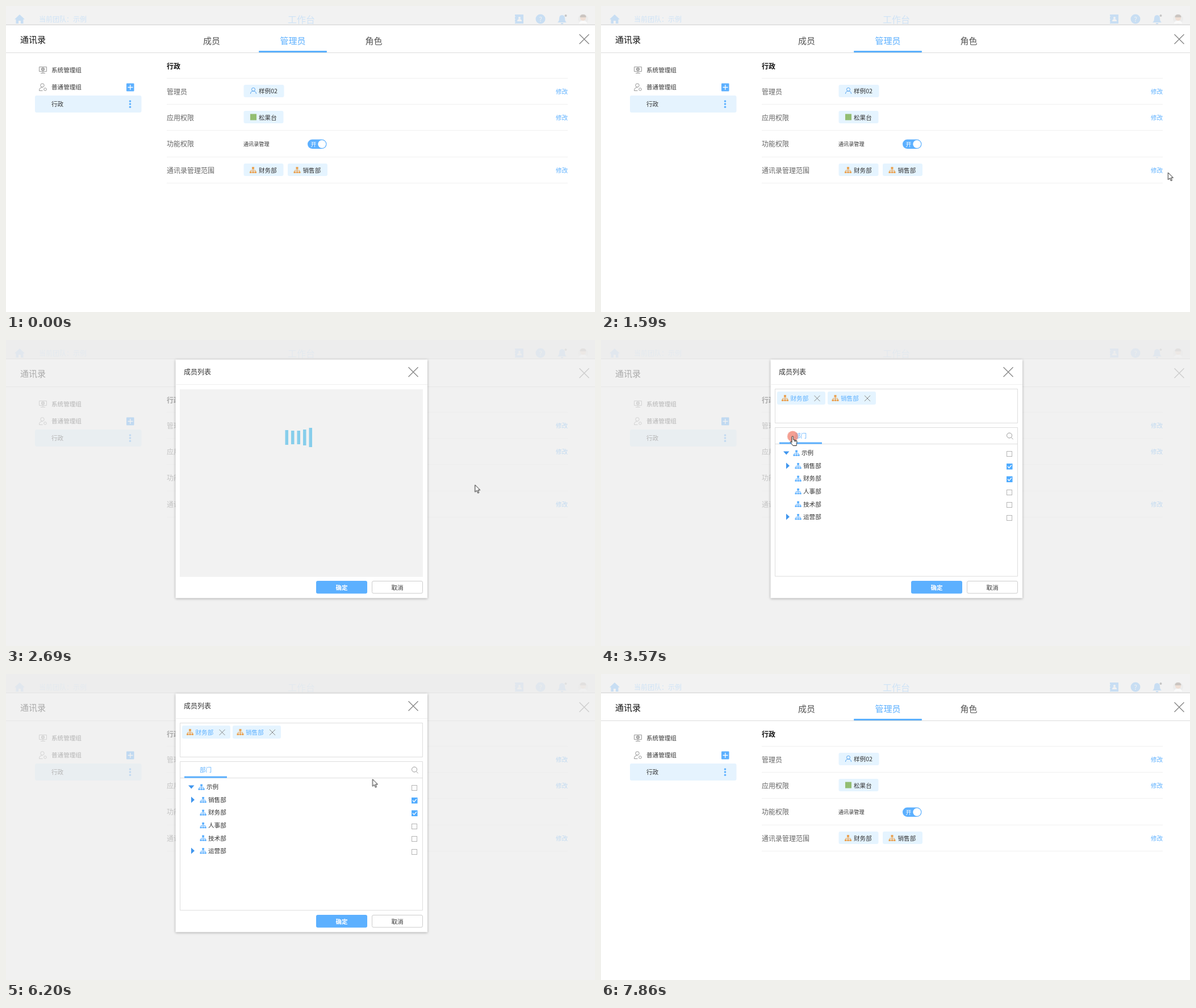
Recreate the animation shown at these times as an HTML page. Size 1037 by 540 pixels, loop 8.34 s.

```html
<!DOCTYPE html>
<html lang="zh-CN">
<head>
<meta charset="utf-8">
<title>通讯录</title>
<style>
html, body { margin: 0; width: 100%; height: 100%; overflow: hidden; background: #fff; }
svg { display: block; }
#stage { width: 1037px; height: 540px; font: 10.6px "Noto Sans CJK SC", "Noto Sans CJK", sans-serif; }
text { fill: #333; white-space: pre; }
.big { font-size: 15px; }
.mid { font-size: 12px; }
.small { font-size: 9.1px; }
.label text { font-size: 12px; fill: #666; }
.bold { font-weight: bold; }
.blue { fill: #5cb0ff; }
.link text { fill: #5cb0ff; }
.white { fill: #fff; }
.chip { fill: #e5f4ff; }
.org { color: #eaa457; }
.tree { color: #5cb0ff; }
.rule { stroke: #f0f0f0; fill: none; }
.frame { stroke: #ddd; fill: none; }
.icon { stroke: #999; fill: none; }

.veil, .dialog, .loader, .picked, .menu, .cursor, .shown, .arrow, .hand, .press {
  animation: 8340ms linear infinite;
}
.veil { animation-name: veil; }
.dialog { animation-name: drop, fade; }
.loader { animation-name: load; animation-timing-function: step-end; }
.picked { animation-name: pick; animation-timing-function: step-end; }
.menu { animation-name: menu; animation-timing-function: step-end; }
.cursor { animation-name: travel; }
.shown { animation-name: shown; animation-timing-function: step-end; }
.arrow { animation-name: arrow; animation-timing-function: step-end; }
.hand { animation-name: hand; animation-timing-function: step-end; }
.press { animation-name: press; animation-timing-function: step-end; }
.bars rect {
  fill: #87ceeb; transform-box: fill-box; transform-origin: center;
  animation: pulse 834ms ease-in-out calc(var(--i) * 100ms - 751ms) infinite;
}

@keyframes veil {
  0%, 25.18% { opacity: 0; }
  26.98%, 92.33% { opacity: 1; }
  94.12%, 100% { opacity: 0; }
}
@keyframes drop {
  0% { transform: translateY(-135px); }
  25.26% { transform: translateY(-135px); animation-timing-function: ease-out; }
  28.86% { transform: none; }
  88.97% { transform: none; animation-timing-function: ease-out; }
  92.57%, 100% { transform: translateY(-135px); }
}
@keyframes fade {
  0%, 25.26% { opacity: 0; }
  27.06%, 88.97% { opacity: 1; }
  90.77%, 100% { opacity: 0; }
}
@keyframes load { 0% { opacity: 1; } 32.37%, 100% { opacity: 0; } }
@keyframes pulse { 0%, 100% { transform: scaleY(.65); } 50% { transform: none; } }
@keyframes pick {
  0% { clip-path: inset(0 100% 0 0); }
  45.56% { clip-path: inset(0 50% 0 0); }
  47.6% { clip-path: inset(0 0 0 0); }
  65.83%, 100% { clip-path: inset(0 100% 0 0); }
}
@keyframes menu { 0% { opacity: 0; } 49.52% { opacity: 1; } 65.83%, 100% { opacity: 0; } }
@keyframes shown { 0% { opacity: 0; } 3.71% { opacity: 1; } 94.24%, 100% { opacity: 0; } }
@keyframes arrow {
  0% { opacity: 1; } 22.3% { opacity: 0; } 25.42% { opacity: 1; } 40.77% { opacity: 0; }
  58.75% { opacity: 1; } 85.85% { opacity: 0; } 89.21%, 100% { opacity: 1; }
}
@keyframes hand {
  0% { opacity: 0; } 22.3% { opacity: 1; } 25.42% { opacity: 0; } 40.77% { opacity: 1; }
  58.75% { opacity: 0; } 85.85% { opacity: 1; } 89.21%, 100% { opacity: 0; }
}
@keyframes press {
  0% { opacity: 0; } 23.5% { opacity: .75; } 24.7% { opacity: 0; } 42.75% { opacity: .75; }
  47.5% { opacity: 0; } 65.1% { opacity: .75; } 66.1% { opacity: 0; } 87.7% { opacity: .75; }
  88.73%, 100% { opacity: 0; }
}
@keyframes travel {
  0%, 3.71% { transform: translate(620px, 482px); }
  7.55% { transform: translate(760px, 400px); }
  11.39% { transform: translate(940px, 312px); }
  13.31% { transform: translate(975px, 303px); }
  19.06% { transform: translate(998.5px, 294px); }
  22.78%, 28.66% { transform: translate(984px, 288px); }
  35.13% { transform: translate(700px, 230px); }
  40.89% { transform: translate(342px, 171px); }
  41.85%, 43.76% { transform: translate(337.5px, 170px); }
  47.6%, 57.25% { transform: translate(376.5px, 175.5px); }
  66.79% { transform: translate(565px, 300px); }
  68.71% { transform: translate(575px, 297px); }
  70.62% { transform: translate(610px, 250px); }
  72.54% { transform: translate(640px, 205px); }
  74.34% { transform: translate(645.5px, 185px); }
  80.34% { transform: translate(610px, 476px); }
  83.93% { transform: translate(600px, 450px); }
  86.81%, 100% { transform: translate(592px, 437px); }
}
</style>
</head>
<body>
<svg id="stage" viewBox="0 0 1037 540">
  <defs>
    <g id="org" fill="currentColor">
      <path d="M4 0h4v4H4zM0 8h3.5v3H0zM4.3 8h3.5v3H4.3zM8.5 8H12v3H8.5z"/>
      <path d="M6 4v4M1.8 8V6h8.4v2" fill="none" stroke="currentColor"/>
    </g>
    <path id="cross" d="M0 0 17 17M17 0 0 17" stroke="#888" stroke-width="1.4"/>
    <path id="xs" d="M0 0 10 10M10 0 0 10" stroke="#888"/>
    <rect id="box" x="714.5" y="-4.5" width="9" height="9" fill="#fff" stroke="#b5b5b5"/>
    <g id="tick">
      <rect x="714" y="-5" width="10.5" height="10.5" fill="#4fabff"/>
      <path d="m716 0 2.4 2.6 4.4-5" fill="none" stroke="#fff" stroke-width="1.4"/>
    </g>
    <path id="closed" d="M326 -5.5 332 0 326 5.5Z" fill="#4096ee"/>
  </defs>

  <!-- top bar -->
  <path d="M0 0h1037v33H0z" fill="#f2f2f2"/>
  <path d="M0 32.5h1037" stroke="#e9e9e9"/>
  <path d="M0 33.5h1037" stroke="#d9d9d9"/>
  <g fill="#c8def3">
    <path d="M24 15 33 23.5h-2.5V31H26v-5h-4v5h-4.5v-7.5H15Z"/>
    <path d="M896 15h15v16h-15z"/>
    <circle cx="941" cy="23" r="8.5"/>
    <path d="M971 29q3-2 3-7 0-6 5-6t5 6q0 5 3 7ZM977 30h4v2h-4Z"/>
    <text class="mid" style="fill:#cfe3f6" x="58" y="27.5">当前团队：示例</text>
    <text style="fill:#cfe3f6;font-size:16px" x="496" y="30">工作台</text>
  </g>
  <circle cx="985.5" cy="17" r="2" fill="#c5c5c5"/>
  <g fill="#f2f2f2">
    <circle cx="904" cy="21" r="2"/><path d="M900 27q0-4 4-4t4 4ZM895 18h2v1h-2zM895 23h2v1h-2zM895 28h2v1h-2z"/>
    <text style="fill:#f2f2f2;font-size:12px" x="941" y="27.5" text-anchor="middle">?</text>
  </g>
  <circle cx="1016" cy="23" r="9" fill="#ececec"/>
  <path d="M1009 31q0-5 7-5t7 5Z" fill="#fafafa"/>
  <circle cx="1016" cy="21" r="5" fill="#efdfd5"/>
  <path d="M1010.5 20q0-5 5.5-5t5.5 5Z" fill="#cbc5c1"/>

  <!-- panel header -->
  <path d="M0 82.5h1037" stroke="#dcdcdc"/>
  <text class="big" style="fill:#111" x="25" y="65">通讯录</text>
  <g class="big">
    <text style="fill:#555" x="347" y="66.5">成员</text>
    <text class="blue" x="482.5" y="66.5">管理员</text>
    <text style="fill:#555" x="632.5" y="66.5">角色</text>
  </g>
  <rect class="blue" x="445" y="79" width="120" height="3" rx="1"/>
  <use href="#cross" x="1009.5" y="50"/>

  <!-- groups -->
  <rect x="51" y="158" width="187.5" height="30" rx="3" fill="#e5f3fe"/>
  <g class="icon">
    <path d="M58.5 107.5h13v8h-13zM65 115.5v3M61 118.5h8"/>
    <circle cx="65" cy="111.5" r="2" stroke-width="2"/>
    <circle cx="64" cy="140" r="3.2"/><path d="M58.5 149.5q0-6 6-6M58.5 149.5h6"/>
    <circle cx="69" cy="147" r="2.3"/>
  </g>
  <text x="80" y="117">系统管理组</text>
  <text x="80" y="147">普通管理组</text>
  <text x="80" y="177">行政</text>
  <rect class="blue" x="212" y="136.5" width="13.5" height="14" rx="1"/>
  <path d="M214.5 143.5h9M218.8 139v9" stroke="#fff" stroke-width="1.3"/>
  <g class="blue">
    <circle cx="218.5" cy="168" r="1.8"/><circle cx="218.5" cy="173" r="1.8"/><circle cx="218.5" cy="178.2" r="1.8"/>
  </g>

  <!-- details -->
  <text class="mid bold" style="fill:#111" x="283" y="110.5">行政</text>
  <path class="rule" d="M283 127.5h706m0 46h-706m0 46h706m0 47h-706m0 46h706"/>
  <g class="label">
    <text x="283" y="156">管理员</text>
    <text x="283" y="202">应用权限</text>
    <text x="283" y="248">功能权限</text>
    <text x="283" y="295">通讯录管理范围</text>
  </g>
  <g class="link">
    <text x="968" y="154.5">修改</text>
    <text x="968" y="200.5">修改</text>
    <text x="968" y="293.5">修改</text>
  </g>
  <g class="chip">
    <rect x="418.5" y="139" width="71" height="22" rx="3"/>
    <rect x="418.5" y="185" width="70" height="22" rx="3"/>
    <rect x="418.5" y="278" width="70" height="22" rx="3"/>
    <rect x="496" y="278" width="70" height="22" rx="3"/>
  </g>
  <g fill="none" stroke="#5ba6ee">
    <circle cx="435.5" cy="147.3" r="3"/><path d="M430.5 155q0-4.7 5-4.7t5 4.7"/>
  </g>
  <rect x="430" y="190.5" width="11" height="11" fill="#93be72"/>
  <text x="445" y="154">样例02</text>
  <text x="445" y="200.5">松果台</text>
  <text class="small" x="418" y="247.3">通讯录管理</text>
  <rect class="blue" x="531" y="235.5" width="33.5" height="16.5" rx="8.2"/>
  <circle cx="556.3" cy="243.7" r="7" fill="#fff"/>
  <text class="white" style="font-size:10px" x="536.5" y="247.5">开</text>
  <g class="org"><use href="#org" x="429" y="284"/><use href="#org" x="506.5" y="284"/></g>
  <text x="445" y="293.5">财务部</text>
  <text x="522.5" y="293.5">销售部</text>

  <path class="veil" d="M0 0h1037v540H0z" fill="#ececec" fill-opacity=".7"/>

  <!-- member dialog -->
  <g class="dialog">
    <rect x="298.5" y="34.5" width="443.5" height="421" fill="#fff" style="filter:drop-shadow(0 1px 2px rgba(0,0,0,.3))"/>
    <path class="rule" d="M298.5 78.5H742"/>
    <text class="mid" x="313" y="61">成员列表</text>
    <use href="#cross" x="708.5" y="48"/>
    <path class="frame" d="M306.5 86.5h427v60h-427zM306.5 154.5h427v262.5h-427zM307 183.5h426"/>

    <g class="chip">
      <rect x="310" y="91" width="85" height="23" rx="3"/><rect x="399" y="91" width="85" height="23" rx="3"/>
    </g>
    <g class="org"><use href="#org" x="318" y="97"/><use href="#org" x="406.5" y="97"/></g>
    <g class="link">
      <text x="333.5" y="106.7">财务部</text>
      <text x="422" y="106.7">销售部</text>
      <text x="341" y="173">部门</text>
    </g>
    <use href="#xs" x="375.5" y="98"/><use href="#xs" x="464" y="98"/>

    <g class="picked">
      <rect x="341" y="162" width="21.2" height="14.5" fill="#3390ff"/>
      <text class="white" x="341" y="173">部门</text>
    </g>
    <rect class="blue" x="314" y="180.5" width="75" height="3"/>
    <g class="icon"><circle cx="719" cy="168.5" r="4.5"/><path d="m722.3 172 3.2 3.2"/></g>

    <path d="M321 196.5h10.5l-5.2 6Z" fill="#4096ee"/>
    <use href="#closed" y="222"/><use href="#closed" y="312"/>
    <g class="tree">
      <use href="#org" transform="translate(338.5 194.5) scale(.93)"/>
      <use href="#org" transform="translate(341.5 217) scale(.93)"/>
      <use href="#org" transform="translate(341.5 239.5) scale(.93)"/>
      <use href="#org" transform="translate(341.5 262) scale(.93)"/>
      <use href="#org" transform="translate(341.5 284.5) scale(.93)"/>
      <use href="#org" transform="translate(341.5 307) scale(.93)"/>
    </g>
    <text x="353" y="203">示例</text>
    <text x="356" y="226">销售部</text>
    <text x="356" y="248">财务部</text>
    <text x="356" y="271">人事部</text>
    <text x="356" y="293.5">技术部</text>
    <text x="356" y="316">运营部</text>
    <use href="#box" y="201"/><use href="#tick" y="223"/><use href="#tick" y="245.5"/>
    <use href="#box" y="269"/><use href="#box" y="291"/><use href="#box" y="314"/>

    <rect class="blue" x="546" y="425" width="90" height="22.5" rx="3"/>
    <text class="white bold" x="580.5" y="440.5">确定</text>
    <rect x="644.5" y="425.5" width="89" height="21.5" rx="2.5" fill="#fff" stroke="#ccc"/>
    <text x="678.5" y="440.5">取消</text>

    <g class="loader">
      <path d="M305.5 86H734.5v332H305.5z" fill="#fff"/>
      <path d="M306 87H734v331H306z" fill="#f2f2f2"/>
      <g class="bars">
        <rect x="491.5" y="154" width="5.5" height="36" style="--i:0"/>
        <rect x="502" y="154" width="5.5" height="36" style="--i:1"/>
        <rect x="512.5" y="154" width="5.5" height="36" style="--i:2"/>
        <rect x="523" y="154" width="5.5" height="36" style="--i:3"/>
        <rect x="533.5" y="154" width="5.5" height="36" style="--i:4"/>
      </g>
    </g>

    <g class="menu">
      <path d="M369.5 143.5h83v18h-83zM411.5 143.5v18" fill="#ececec" stroke="#bdbdbd"/>
      <text class="small" x="380.5" y="156">搜索</text>
      <text class="small" x="422.5" y="156">复制</text>
    </g>
  </g>

  <!-- pointer -->
  <g class="shown">
    <g class="cursor" stroke="#222" fill="#fff" stroke-linejoin="round">
      <circle class="press" r="9.5" fill="#f0806f" stroke="none"/>
      <path class="arrow" d="M0 0V12.5L3 9.8 5 14.5 7 13.6 5 9.1H9Z"/>
      <path class="hand" d="M-1.5 9V1.2a1.3 1.3 0 0 1 2.6 0V6l5 1.2q1.7.5 1.5 2.3l-.9 4v3H.5L-4 10.5q-.4-1.8 1-1.2l1.5 1.7Z M3.5 6.7v3M5.6 7.2v2.5"/>
    </g>
  </g>
</svg>
</body>
</html>
```
